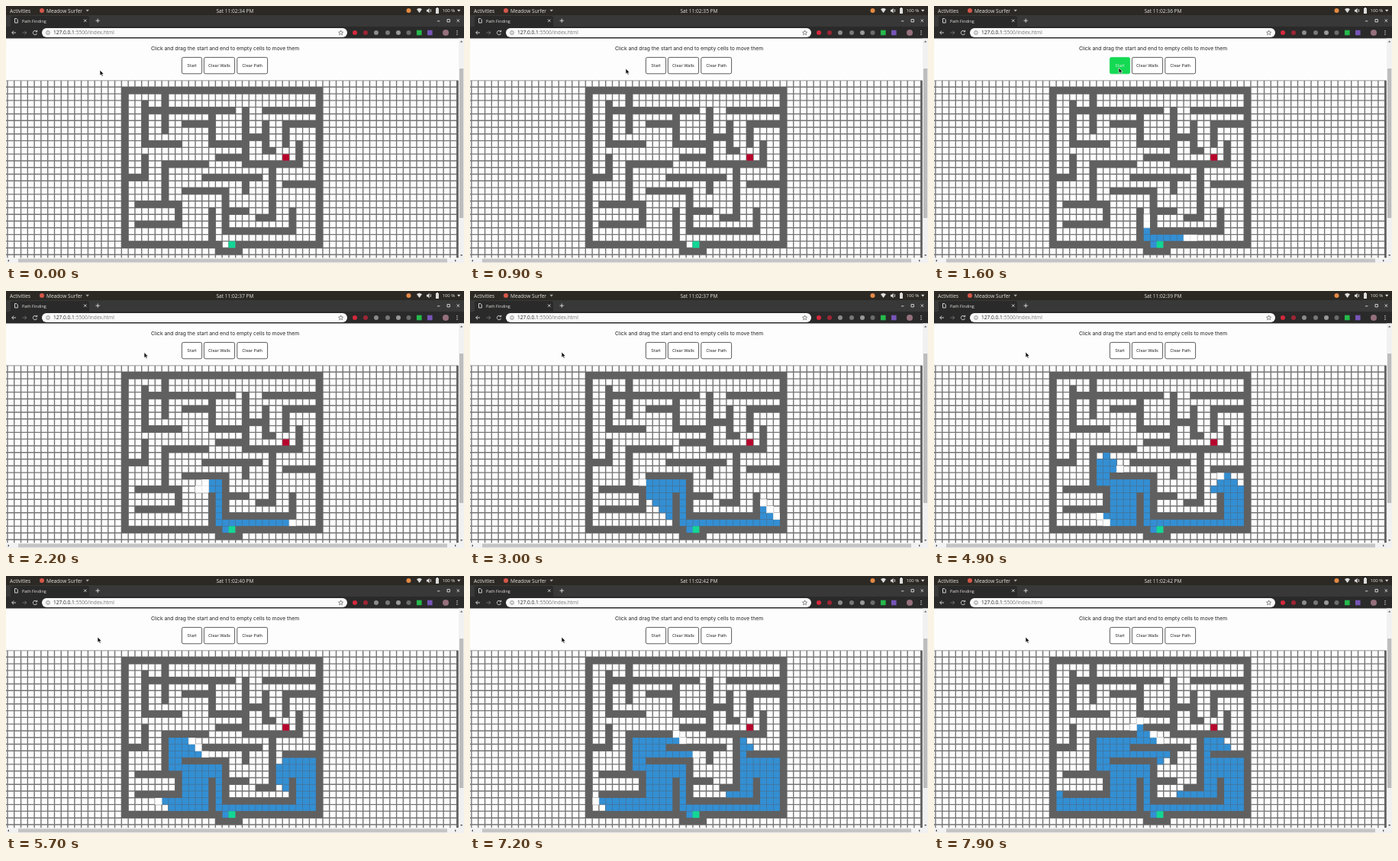
Recreate the animation shown at these times as an HTML page. Size 600x337 px, loop 8000 ms.

```html
<!DOCTYPE html>
<html lang="en">
<head>
<meta charset="utf-8">
<title>Path Finding</title>
<style>
  html, body { margin: 0; width: 100%; height: 100%; overflow: hidden; background: #fdfdfd; }
  svg { display: block; width: 100vw; height: 100vh; }
  text { font-family: Inter, "Open Sans", sans-serif; }
  .bar text { font-family: "Open Sans", "Noto Sans", sans-serif; fill: #e4e2de; }
  .mid { text-anchor: middle; }
  .icon { fill: none; stroke: #dedede; stroke-width: .9; }
</style>
</head>
<body>
<svg id="stage" viewBox="0 0 600 337" preserveAspectRatio="none">
  <defs><clipPath id="view"><rect y="97.6" width="591" height="232.6"/></clipPath></defs>
  <rect width="600" height="337" fill="#fdfdfd"/>

  <g class="bar">
    <rect width="600" height="12" fill="#2c2925"/>
    <text x="5" y="8.6" font-size="6.6">Activities</text>
    <circle cx="47" cy="6" r="3" fill="#d8574a"/>
    <text x="53" y="8.6" font-size="6.6">Meadow Surfer</text>
    <path d="M104.5 4.8h4.4l-2.2 2.6z" fill="#aaa"/>
    <text id="clock" class="mid" x="300" y="8.6" font-size="6.6"></text>
    <circle cx="527.5" cy="6" r="3" fill="#e58a45"/>
    <path d="M538 4.3Q541.5 1.3 545 4.3L541.5 9z" fill="#ddd"/>
    <path d="M551 4.7h1.6l2-2v6.8l-2-2H551z" fill="#ddd"/>
    <path class="icon" d="M556 4q1.4 2 0 4"/>
    <path d="M563 3h1v-1h2v1h1v7h-4z" fill="#ddd"/>
    <text x="571.5" y="8.4" font-size="6">100 %</text>
    <path d="M591 4.8h4.4l-2.2 2.6z" fill="#ddd"/>

    <rect y="12" width="600" height="16" fill="#383838"/>
    <path d="M3 28Q6 28 6 25V16Q6 13 9 13H106Q109 13 109 16V25Q109 28 112 28z" fill="#2a2a2a"/>
    <path class="icon" d="M11.5 16.5h2.3l1.5 1.5v4h-3.8z" stroke-width=".6"/>
    <text x="21" y="21.6" font-size="5.5">Path Finding</text>
    <path class="icon" d="M102 17.5l3.4 3.4m0-3.4l-3.4 3.4M117.5 19.2h5.4m-2.7-2.7v5.4"/>
    <path class="icon" d="M565 19.8h3.4M578 17.5h3.4v3.4h-3.4zM590.6 17.5l3.4 3.4m0-3.4l-3.4 3.4" stroke-width=".7"/>

    <rect y="27" width="600" height="15.5" fill="#2a2a2a"/>
    <path class="icon" d="M13 35H7.8m2.3-2.4L7.7 35l2.4 2.4"/>
    <path class="icon" d="M21.5 35h5.2m-2.3-2.4l2.4 2.4-2.4 2.4" stroke-opacity=".4"/>
    <path class="icon" d="M40.2 33.4A2.7 2.7 0 1 0 40.6 36M40.7 31.8v2h-2"/>
    <rect x="47" y="29" width="400" height="12" rx="6" fill="#fbfbfb"/>
    <circle cx="55" cy="35" r="2.4" fill="none" stroke="#555" stroke-width=".6"/>
    <path d="M55 34.7v1.6M55 33.4v.5" stroke="#555" stroke-width=".6"/>
    <text x="62" y="37.3" font-size="6.6" style="fill:#222">127.0.0.1<tspan fill="#777">:5500/index.html</tspan></text>
    <path d="M438.6 31.9l.9 2.1 2.2.2-1.7 1.4.5 2.2-1.9-1.2-1.9 1.2.5-2.2-1.7-1.4 2.2-.2z" fill="none" stroke="#444" stroke-width=".6"/>
    <g id="extensions"></g>
    <path d="M591 32v1.2m0 1.2v1.2m0 1.2v1.2" stroke="#ddd" stroke-width="1.2"/>
  </g>

  <text class="mid" x="287" y="58.2" font-size="6.75" fill="#222">Click and drag the start and end to empty cells to move them</text>
  <g id="buttons" font-size="5.45"></g>

  <g clip-path="url(#view)">
    <g transform="translate(151.35 106.3) scale(8.787)">
      <path id="grid" stroke="#747474" stroke-width=".16"/>
      <g id="cells" stroke-width=".08"></g>
      <path id="walls" transform="translate(.5 .5)" fill="none" stroke="#606060" stroke-width="1.04" stroke-linecap="square"/>
      <rect x="15.96" y="23" width="1" height="1" fill="#12d696"/>
      <rect x="24" y="10.02" width="1" height=".96" fill="#b6062c"/>
    </g>
  </g>
  <rect x="590.2" y="97.6" width="2.6" height="232.6" fill="#606060"/>

  <rect x="593" y="42.5" width="7" height="294.5" fill="#f1f1f1"/>
  <rect y="330.5" width="600" height="6.5" fill="#f1f1f1"/>
  <rect x="594" y="82" width="5.2" height="196" fill="#bdbdbd"/>
  <rect x="16" y="331.4" width="562" height="4.8" fill="#c4c4c4"/>
  <path d="M595 47.4h3.4l-1.7-2zM595 326h3.4l-1.7 2zM4 332.2v3.4l-2-1.7zM588 332.2v3.4l2-1.7z" fill="#555"/>

  <path id="cursor" d="M0 0V7.2L1.7 5.7 2.8 8.3 4.1 7.7 3 5.2H5.2z" fill="#111" stroke="#fff" stroke-width=".6"/>
</svg>

<script>
const LOOP = 8000, STEP = 100, FRESH = 4;
const $ = id => document.getElementById(id);

function add(parent, tag, attrs, text) {
  const node = document.createElementNS('http://www.w3.org/2000/svg', tag);
  for (const key in attrs) node.setAttribute(key, attrs[key]);
  if (text) node.textContent = text;
  return parent.appendChild(node);
}

// Maze walls as strokes through cell centres
const wallPath = 'M14 23H0V0H29V23H17V24H14M6 1V6M3 2V8H8M3 3H16M9 5H13M13 3V8H18' +
  'M18 3V11H26V8M18 7H21V9H22M21 5V7M21 3H28M28 5H24V8M14 10H17M22 11V19H20' +
  'M24 14H28M12 13H20M18 13V15M12 11H6V16M1 13H3V10M9 15H15V21H25V18M16 18H18' +
  'M2 17H8V20H2M13 18V22';

function wallCells(path) {
  const filled = new Set();
  let x = 0, y = 0;
  for (const [, cmd, args] of path.matchAll(/([MHV])([\d ]+)/g)) {
    const [a, b] = args.split(' ').map(Number);
    if (cmd === 'M') { x = a; y = b; }
    const toX = cmd === 'H' ? a : x, toY = cmd === 'V' ? a : y;
    filled.add(x + ',' + y);
    while (x !== toX || y !== toY) {
      x += Math.sign(toX - x);
      y += Math.sign(toY - y);
      filled.add(x + ',' + y);
    }
  }
  return filled;
}

// Breadth-first order of the cells reached from the start
function searchOrder(startX, startY, limit) {
  const seen = wallCells(wallPath);
  seen.add(startX + ',' + startY);
  const queue = [[startX, startY]];
  for (let i = 0; i < queue.length && queue.length <= limit; i++) {
    const [x, y] = queue[i];
    for (const [dx, dy] of [[0, -1], [-1, 0], [0, 1], [1, 0]]) {
      const next = [x + dx, y + dy], key = next.join();
      if (seen.has(key)) continue;
      seen.add(key);
      queue.push(next);
    }
  }
  return queue.slice(1);
}

function track(keys, t) {
  const i = keys.findIndex(k => k[0] > t);
  if (i < 0) return keys[keys.length - 1].slice(1);
  if (i === 0) return keys[0].slice(1);
  const from = keys[i - 1], to = keys[i];
  const u = (t - from[0]) / (to[0] - from[0]);
  return from.slice(1).map((v, j) => v + (to[j + 1] - v) * u);
}

const pointerKeys = [[0, 123, 84], [300, 126, 84], [900, 204, 82], [1200, 242, 81],
  [1900, 242, 81], [2500, 120, 80]];
const visitedKeys = [[1300, 0], [1600, 8], [1800, 10], [2700, 33], [3000, 45], [3600, 52],
  [4000, 64], [5400, 97], [5700, 105], [7200, 132], [7900, 150]];

let lines = '';
for (let x = -17; x <= 50; x++) lines += `M${x} -1V26`;
for (let y = -1; y <= 25; y++) lines += `M-18 ${y}H50`;
$('grid').setAttribute('d', lines);
$('walls').setAttribute('d', wallPath);

const cells = searchOrder(16, 23, 180).map(([x, y]) =>
  add($('cells'), 'rect', { x, y, width: 1, height: 1 }));

const buttons = [['Start', 230, 27], ['Clear Walls', 259, 41], ['Clear Path', 302.4, 40.6]]
  .map(([label, x, width]) => ({
    box: add($('buttons'), 'rect', { x: x + .4, y: 67.4, width: width - .8, height: 21.4, rx: 2, 'stroke-width': .8, fill: '#fff', stroke: '#333' }),
    label: add($('buttons'), 'text', { x: x + width / 2, y: 80.1, class: 'mid', fill: '#222' }, label)
  }));

[[457, '#d5283c'], [471, '#9c2636'], [485, '#8b8b8b'], [500, '#777'], [514, '#999'], [527.5, '#6c6c6c']]
  .forEach(([cx, fill]) => add($('extensions'), 'circle', { cx, cy: 35, r: 3, fill }));
[[538, '#25b84c'], [552, '#7655b5']]
  .forEach(([x, fill]) => add($('extensions'), 'rect', { x, y: 31.7, width: 6.6, height: 6.6, fill }));
add($('extensions'), 'circle', { cx: 576, cy: 35, r: 4, fill: '#95707c' });

function draw(t) {
  const [x, y] = track(pointerKeys, t);
  $('cursor').setAttribute('transform', `translate(${x} ${y})`);
  $('clock').textContent = `Sat 11:02:${35 + Math.floor((t - 200) / 1000)} PM`;

  const hover = x >= 230, start = buttons[0];
  start.box.setAttribute('fill', hover ? '#14d953' : '#fff');
  start.box.setAttribute('stroke', hover ? '#14d953' : '#333');
  start.label.setAttribute('fill', hover ? '#c9f7d7' : '#222');

  const visited = Math.floor(track(visitedKeys, t)[0] + 1e-6);
  cells.forEach((cell, i) => {
    const blue = i < visited, fresh = visited > 0 && i < visited + FRESH;
    cell.setAttribute('visibility', blue || fresh ? 'visible' : 'hidden');
    cell.setAttribute('fill', blue ? '#338fd3' : '#fff');
    cell.setAttribute('stroke', blue ? '#42759f' : '#e6e6e6');
  });
}

const origin = performance.now();
function tick() {
  const t = (performance.now() - origin) % LOOP;
  draw(Math.floor(t / STEP) * STEP);
  requestAnimationFrame(tick);
}
tick();
</script>
</body>
</html>
```
